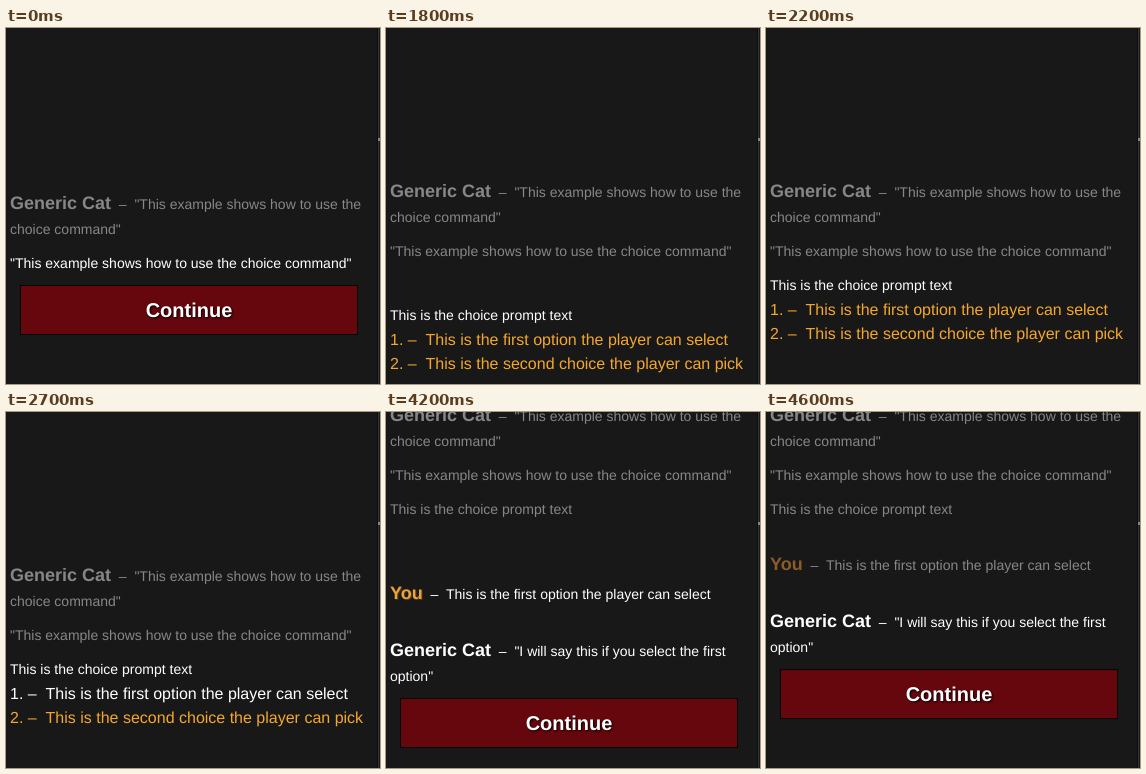
Animation, 374 px wide and 356 px high, one loop 5900 ms. Source, as an HTML page:

```html
<!DOCTYPE html>
<html lang="en">
<head>
<meta charset="utf-8">
<title>Choice command</title>
<style>
  html, body { margin: 0; width: 100%; height: 100%; overflow: hidden; background: #181818; }
  svg { display: block; }
  text { font: 14px "Liberation Sans", Arial, sans-serif; fill: #fff; white-space: pre; text-rendering: geometricPrecision; }
  .name { font-size: 18px; font-weight: bold; }
  .option { font-size: 16px; fill: #f5a72c; }
  .option.hover { fill: #fff; }
  .you { fill: #e9a53c; text-shadow: 1px 1px 1px #5a3510; }
  .old { fill: #878787; }
  .old .you { fill: #8c5c28; text-shadow: none; }
  .button { font-size: 20px; font-weight: bold; text-anchor: middle; text-shadow: 1px 1px 2px #000; }
</style>
</head>
<body>
<svg width="374" height="356" viewBox="0 0 374 356">
  <rect x="371" width="1" height="356" fill="#0d0d0d"/>
  <rect x="372" width="1" height="356" fill="#353535"/>
  <rect x="372" y="110" width="2" height="3" fill="#858585"/>
  <g id="log">
    <text class="old" x="4" y="181"><tspan class="name">Generic Cat</tspan>&#160;&#160;–&#160;&#160;"This example shows how to use the</text>
    <text class="old" x="4" y="206">choice command"</text>
    <text id="line" x="4" y="240">"This example shows how to use the choice command"</text>
    <g id="choice">
      <text id="prompt" x="4" y="274">This is the choice prompt text</text>
      <g id="options">
        <text class="option" x="4" y="299">1. –&#160;&#160;This is the first option the player can select</text>
        <text class="option" x="4" y="323">2. –&#160;&#160;This is the second choice the player can pick</text>
      </g>
    </g>
  </g>
  <g id="reply">
    <text id="you" x="4" y="158"><tspan class="name you">You</tspan>&#160;&#160;–&#160;&#160;This is the first option the player can select</text>
    <text x="4" y="215"><tspan class="name">Generic Cat</tspan>&#160;&#160;–&#160;&#160;"I will say this if you select the first</text>
    <text x="4" y="240">option"</text>
  </g>
  <g id="button">
    <rect x="14.5" y="257.5" width="337" height="49" fill="#65070d" stroke="#050505"/>
    <text class="button" x="183" y="289">Continue</text>
  </g>
</svg>
<script>
  const LOOP = 5900, STEP = 100, CHOICE = 1800, REPLY = 4200;
  const $ = id => document.getElementById(id);
  const options = document.querySelectorAll('.option');

  const show = (id, on) => $(id).setAttribute('visibility', on ? 'visible' : 'hidden');
  const shift = (id, y) => $(id).setAttribute('transform', `translate(0 ${y})`);
  const dim = (id, on) => $(id).classList.toggle('old', on);

  // Exponential ease-out from the given distance to rest
  const slide = (distance, elapsed) =>
    elapsed >= 500 ? 0 : distance * 2 ** (-elapsed / 50);

  function hoveredOption(t) {
    if (t < 2700) return -1;
    return t >= 3000 && t < 3500 ? 1 : 0;
  }

  function draw(now) {
    const t = Math.floor((now % LOOP) / STEP) * STEP;
    const choosing = t >= CHOICE && t < REPLY;
    const replied = t >= REPLY;
    const replyShift = replied ? slide(29, t - REPLY) : 0;

    shift('log', replied ? -172 : choosing ? -12 : 0);
    dim('line', t >= CHOICE);

    show('choice', t >= CHOICE);
    shift('choice', choosing ? slide(30, t - CHOICE) : 0);
    dim('prompt', replied);
    $('options').style.display = choosing ? '' : 'none';
    options.forEach((option, i) => option.classList.toggle('hover', i === hoveredOption(t)));

    show('reply', replied);
    shift('reply', replyShift);
    dim('you', t >= REPLY + STEP);
    show('button', !choosing);
    shift('button', replyShift);
  }

  const start = performance.now();
  function tick() {
    draw(performance.now() - start);
    requestAnimationFrame(tick);
  }
  tick();
</script>
</body>
</html>
```
